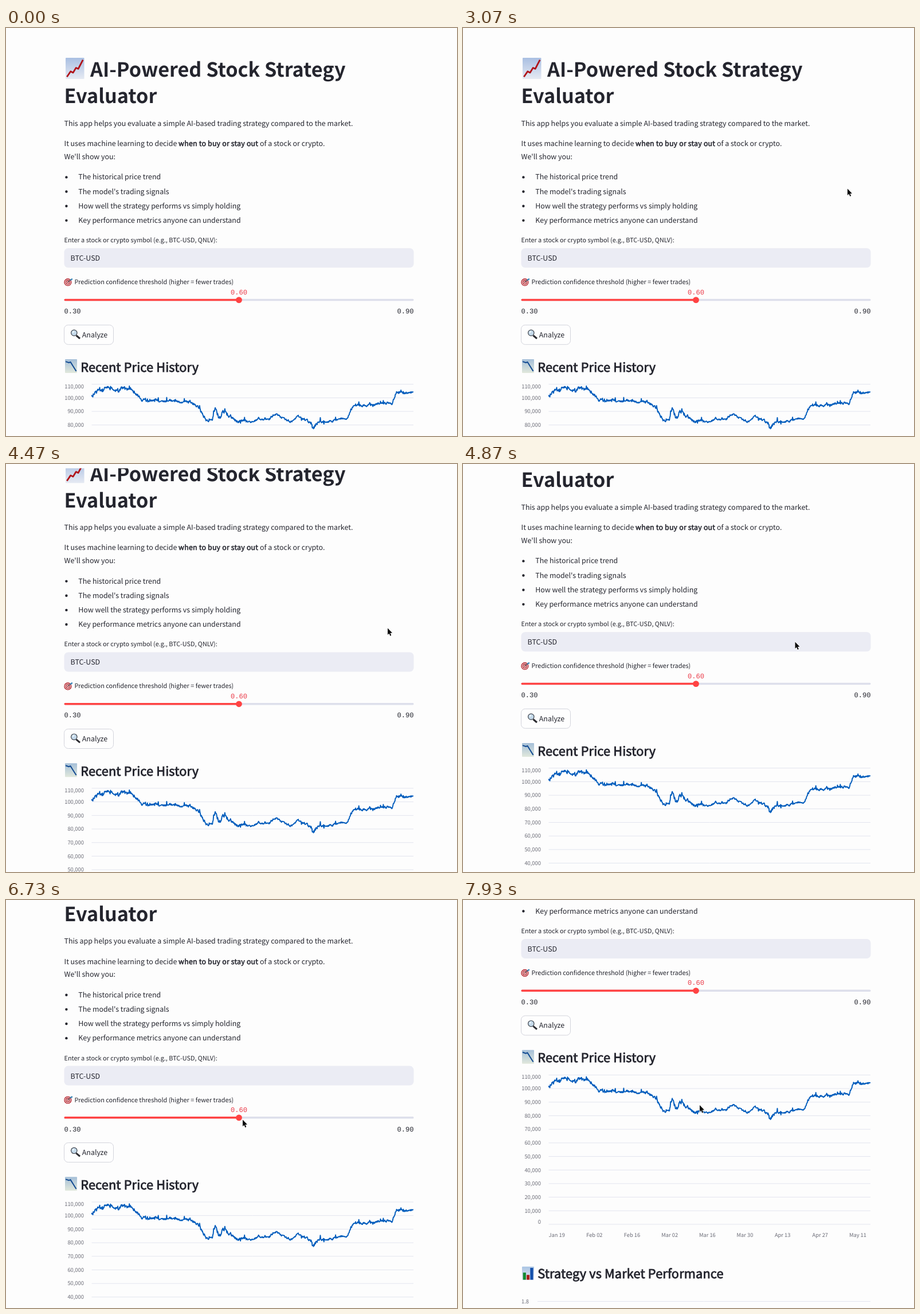
Animation of 787 by 712 pixels, one loop 8 s. Source, as an HTML page with a canvas:

```html
<!DOCTYPE html>
<html lang="en">
<head>
<meta charset="utf-8">
<title>Strategy Evaluator</title>
<style>
html, body { margin: 0; width: 100%; height: 100%; overflow: hidden; background: #fdfdfd; }
canvas { display: block; width: 787px; height: 712px; }
</style>
</head>
<body>
<canvas id="stage"></canvas>
<script>
const W = 787, H = 712, LOOP = 8000;
const LEFT = 101.5, RIGHT = 711.5;
const BG = '#fdfdfd', INK = '#24252e', FAINT = '#6a6b76', RED = '#ff4343', BLUE = '#005cbc', GRID = '#e3e5ef';
const SANS = '"Noto Sans CJK JP", "Noto Sans CJK SC", "Noto Sans", sans-serif';
const MONO = '"Liberation Mono", monospace';
const BODY = 12.41, LABEL = 10.86, HEADING = 21.72, AXIS = 9.3;

const canvas = document.getElementById('stage');
const ctx = canvas.getContext('2d');
const dpr = window.devicePixelRatio || 1;
canvas.width = W * dpr;
canvas.height = H * dpr;

const clamp = k => Math.max(0, Math.min(1, k));
const smooth = k => k * k * (3 - 2 * k);
const glide = (t, start, length) => smooth(clamp((t - start) / length));

// Three flicks of the wheel
const scrollAt = t => 26 * glide(t, 3500, 560) + 65 * glide(t, 4250, 468) + 235.6 * glide(t, 6620, 1500);

// Pointer moves: start, length, dx, dy
const POINTER_START = 930;
const MOVES = [
  [930, 720, -49, -24.5], [2700, 800, 2, 11], [4000, 470, -6, 0],
  [4500, 830, -205.5, 57], [5330, 620, -47.5, 40], [6800, 900, 0, -25.5]
];

function pointerAt(t) {
  let x = 719, y = 300;
  for (const [start, length, dx, dy] of MOVES) {
    const k = glide(t, start, length);
    x += dx * k;
    y += dy * k;
  }
  return [x, y];
}

function random(seed) {
  return () => (seed = (seed * 16807) % 2147483647) / 2147483647;
}

// Turning points of the price curve; noise fills in the rest
const TURNS = [
  [149, 645], [163, 631], [221, 631], [236, 650], [330, 653], [349, 683], [359, 684], [365, 662],
  [372, 680], [379, 669], [402, 686], [460, 682], [473, 673], [496, 687], [510, 677], [518, 683],
  [528, 684], [536, 698], [547, 687], [596, 681], [606, 659], [640, 657], [674, 654], [681, 636], [711, 637]
];

function trendAt(x) {
  const i = Math.max(1, TURNS.findIndex(p => p[0] >= x));
  const [[x0, y0], [x1, y1]] = [TURNS[i - 1], TURNS[i]];
  return y0 + (y1 - y0) * (x - x0) / (x1 - x0);
}

function makePrices() {
  const rnd = random(2025), points = [];
  let drift = 0;
  for (let x = 149.5; x <= 711; x += 0.7) {
    const rough = 2.2 + 2.3 * Math.exp(-(x - 149) / 90) + 1.6 * Math.exp(-(((x - 375) / 35) ** 2)) + 2 * Math.exp(-(((x - 535) / 12) ** 2));
    drift = 0.8 * drift + (rnd() - 0.5) * rough;
    const spike = rnd() < 0.07 ? (rnd() - 0.5) * 4.4 : 0;
    const y = trendAt(x) + drift + (rnd() - 0.5 + spike) * rough;
    points.push([x, Math.max(622.5, y)]);
  }
  return points;
}
const PRICES = makePrices();

function text(str, x, y, { size = BODY, color = INK, align = 'left', weight = 400, family = SANS, heavy = 0, gap = 0 } = {}) {
  ctx.font = `${weight} ${size}px ${family}`;
  ctx.letterSpacing = gap + 'px';
  ctx.textAlign = align;
  ctx.fillStyle = color;
  ctx.fillText(str, x, y);
  if (heavy) {
    ctx.strokeStyle = color;
    ctx.lineWidth = heavy;
    ctx.lineJoin = 'miter';
    ctx.miterLimit = 2;
    ctx.strokeText(str, x, y);
  }
  return x + ctx.measureText(str).width;
}

function box(x, y, w, h, r, fill, stroke) {
  ctx.beginPath();
  ctx.roundRect(x, y, w, h, r);
  if (fill) { ctx.fillStyle = fill; ctx.fill(); }
  if (stroke) { ctx.strokeStyle = stroke; ctx.lineWidth = 1; ctx.stroke(); }
}

function disc(x, y, r, fill) {
  ctx.beginPath();
  ctx.arc(x, y, r, 0, Math.PI * 2);
  ctx.fillStyle = fill;
  ctx.fill();
}

function line(points, color, width) {
  ctx.beginPath();
  points.forEach(([x, y]) => ctx.lineTo(x, y));
  ctx.strokeStyle = color;
  ctx.lineWidth = width;
  ctx.lineJoin = 'round';
  ctx.stroke();
}

// Icon panel; returns a map from a 0..1 square
function panel(x, y, w, h, top, bottom) {
  const g = ctx.createLinearGradient(0, y, 0, y + h);
  g.addColorStop(0, top);
  g.addColorStop(1, bottom);
  box(x, y, w, h, 1, g);
  return (u, v) => [x + w * u, y + h * v];
}

function risingIcon() {
  const at = panel(104, 52, 32.5, 37, '#a9bfe2', '#e6eaf3');
  line([at(.07, .9), at(.27, .64), at(.4, .7), at(.56, .47), at(.68, .52), at(.93, .1)], '#b01319', 2.8);
}

function fallingIcon() {
  const at = panel(103, 578, 21, 24, '#a5bfd8', '#e1e8dc');
  line([at(.05, .17), at(.33, .25), at(.45, .2), at(.68, .52), at(.93, .87)], '#124a92', 2);
}

function barsIcon() {
  const at = panel(103, 956, 21, 23.5, '#a9c4e4', '#e4eaf2');
  [['#128a32', .08, .45], ['#a8201c', .38, .62], ['#1450ac', .68, .1]].forEach(([color, u, v]) => {
    const [x, y] = at(u, v), bottom = at(0, .98)[1];
    ctx.fillStyle = color;
    ctx.fillRect(x, y, 5.2, bottom - y);
  });
}

function targetIcon() {
  for (let i = 0; i < 5; i++) disc(107.9, 443.7, 6.6 - i * 1.35, i % 2 ? '#f1dcdc' : '#b5232d');
  line([[108, 443.5], [113.5, 438.6]], '#3c4650', 1.1);
  line([[112.2, 440.2], [115.8, 437.6]], '#3a86b8', 2.4);
}

function lensIcon() {
  line([[122.5, 536.5], [129, 542]], '#2b2b30', 3);
  disc(118.8, 532, 5.8, '#3f444c');
  disc(118.8, 532, 4.6, '#c4d9ea');
  disc(117.4, 530.4, 1.7, '#e9f3fa');
}

function intro() {
  risingIcon();
  const title = { size: 34.2, weight: 700 };
  text('AI-Powered Stock Strategy', 147, 85.3, title);
  text('Evaluator', LEFT, 131.3, title);
  text('This app helps you evaluate a simple AI-based trading strategy compared to the market.', LEFT, 170.8);
  let x = text('It uses machine learning to decide ', LEFT, 206.2);
  x = text('when to buy or stay out', x, 206.2, { heavy: 0.5, gap: 0.18 });
  text(' of a stock or crypto.', x, 206.2);
  text("We'll show you:", LEFT, 228.7);
  ['The historical price trend', "The model's trading signals",
    'How well the strategy performs vs simply holding', 'Key performance metrics anyone can understand']
    .forEach((item, i) => {
      const y = 264.4 + i * 25.15;
      disc(105.4, y - 4, 2.2, INK);
      text(item, 126.3, y);
    });
}

function controls() {
  text('Enter a stock or crypto symbol (e.g., BTC-USD, QNLV):', LEFT, 374.2, { size: LABEL });
  box(LEFT, 384.3, 610, 34, 7, '#ebecf4');
  text('BTC-USD', 112.6, 406.2);

  targetIcon();
  text('Prediction confidence threshold (higher = fewer trades)', 119.4, 447.2, { size: LABEL });
  const mono = { size: 12.13, family: MONO };
  text('0.60', 406.5, 464.8, { ...mono, color: '#ea3a48', align: 'center' });
  box(LEFT, 472.8, 610, 3.5, 1.7, '#dddfeb');
  box(LEFT, 472.8, 305, 3.5, 1.7, RED);
  disc(406.5, 474.6, 5.4, RED);
  text('0.30', LEFT, 498.2, mono);
  text('0.90', RIGHT, 498.2, { ...mono, align: 'right' });

  box(LEFT, 518.3, 86, 34, 7, '#fefefe', '#d3d4dc');
  lensIcon();
  text('Analyze', 132.8, 539.8);
}

function heading(str, y) {
  text(str, 130.2, y, { size: HEADING, heavy: 0.85, gap: 0.15 });
}

function priceChart() {
  const axis = { size: AXIS, color: FAINT };
  fallingIcon();
  heading('Recent Price History', 599.6);
  for (let i = 0; i <= 11; i++) {
    const y = 882.3 - i * 23.69;
    // End labels stay inside the plot
    const labelY = Math.max(625.5, Math.min(877.9, y));
    line([[149.5, y], [711, y]], GRID, 1);
    text(i ? `${i}0,000` : '0', 135.8, labelY + 3.3, { ...axis, align: 'right' });
  }
  line(PRICES, BLUE, 1.9);
  ['Jan 19', 'Feb 02', 'Feb 16', 'Mar 02', 'Mar 16', 'Mar 30', 'Apr 13', 'Apr 27', 'May 11']
    .forEach((day, i) => text(day, 163.7 + i * 65.65, 904.2, { ...axis, align: 'center' }));
}

function strategyChart() {
  barsIcon();
  heading('Strategy vs Market Performance', 976.4);
  line([[130, 1016.8], [711, 1016.8]], GRID, 1);
  text('1.8', 102, 1020.2, { size: AXIS, color: FAINT });
}

function pointer(x, y) {
  ctx.save();
  ctx.translate(x, y);
  ctx.beginPath();
  [[0, 0], [0, 11.6], [2.6, 9.2], [4.4, 13.4], [6.3, 12.6], [4.5, 8.5], [8, 8.3]].forEach(p => ctx.lineTo(...p));
  ctx.closePath();
  ctx.strokeStyle = '#fff';
  ctx.lineWidth = 1.6;
  ctx.lineJoin = 'round';
  ctx.stroke();
  ctx.fillStyle = '#0a0a0a';
  ctx.fill();
  ctx.restore();
}

function draw(t) {
  ctx.setTransform(dpr, 0, 0, dpr, 0, 0);
  ctx.textRendering = 'geometricPrecision';
  ctx.fillStyle = BG;
  ctx.fillRect(0, 0, W, H);

  ctx.save();
  ctx.beginPath();
  ctx.rect(0, 7.5, W, H);
  ctx.clip();
  ctx.translate(0, -scrollAt(t));
  intro();
  controls();
  priceChart();
  strategyChart();
  ctx.restore();

  if (t >= POINTER_START) pointer(...pointerAt(t));
}

const start = performance.now();
function tick() {
  draw((performance.now() - start) % LOOP);
  requestAnimationFrame(tick);
}
tick();
</script>
</body>
</html>
```
